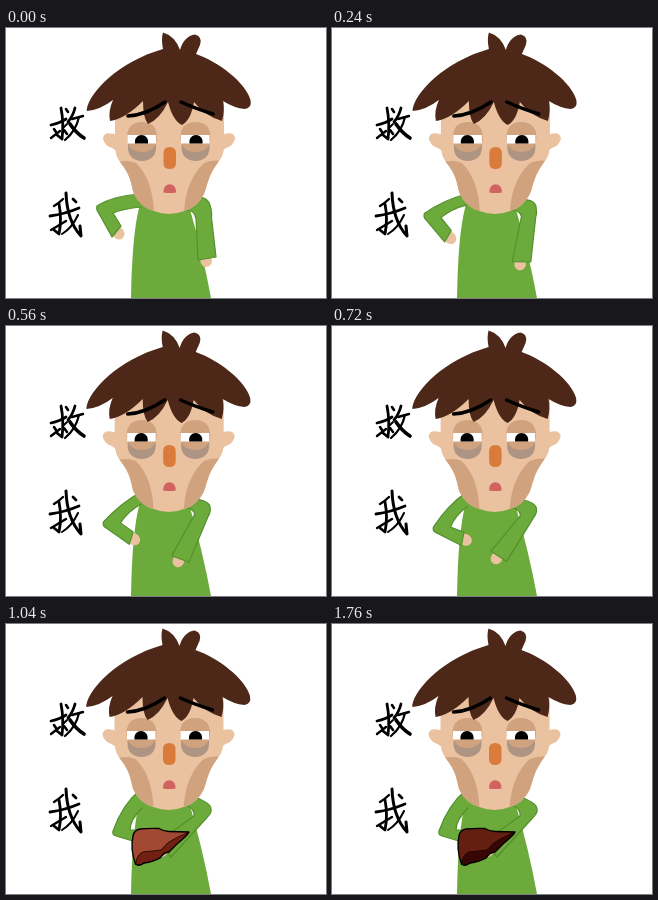
Animation of 320x270 px, one loop 2.2 s. Source, as an HTML page with a canvas:

```html
<!DOCTYPE html>
<html lang="zh">
<head>
<meta charset="utf-8">
<style>
html, body { margin: 0; width: 100%; height: 100%; overflow: hidden; background: #fff; }
canvas { display: block; }
</style>
</head>
<body>
<canvas id="stage" width="320" height="270" role="img" aria-label="救我"></canvas>
<script>
const ctx = document.getElementById('stage').getContext('2d');
const LOOP = 2200, STEP = 40, LAST = 1760, ARMS_END = 900, LIVER_IN = 920;
const SKIN = '#eac2a0', SHADE = '#d0a27e', GREEN = '#6daa3c', SEAM = '#53902b', HAIR = '#4d2818';

const fill = (d, color) => {
  ctx.fillStyle = color;
  ctx.fill(new Path2D(d));
};
const line = (d, color, width) => {
  ctx.strokeStyle = color;
  ctx.lineWidth = width;
  ctx.stroke(new Path2D(d));
};
const oval = (x, y, rx, ry, color, turn = 0) => {
  ctx.fillStyle = color;
  ctx.beginPath();
  ctx.ellipse(x, y, rx, ry, turn, 0, Math.PI * 2);
  ctx.fill();
};

// Arm points: shoulder, bend, elbow, cuff outer, cuff inner, inner elbow, inner bend, armpit
const LEFT = [
  [134,166, 106,168, 91,181, 106,209, 115,198, 107,185, 117,181, 135,179],
  [135,166, 114,175, 95,195, 119,217, 124,205, 112,194, 121,183, 135,177],
  [134,166, 116,181, 107,210, 137,220, 138,206, 124,206, 124,196, 136,184]
];
const RIGHT = [
  [186,170, 203,166, 205,184, 210,229, 192,232, 190,191, 189,182, 179,182],
  [184,172, 205,173, 204,184, 189,236, 171,232, 189,188, 188,183, 179,181],
  [183,171, 205,178, 205,188, 165,233, 152,218, 188,192, 189,185, 180,181]
];

// Smooth path through three poses
function pose(keys, u) {
  const m = 0.489;
  const a = (u - m) * (u - 1) / m;
  const b = u * (u - 1) / (m * (m - 1));
  const c = u * (u - m) / (1 - m);
  return keys[0].map((v, i) => v * a + keys[1][i] * b + keys[2][i] * c);
}

function arm(keys, u, side) {
  const p = pose(keys, u);
  const cx = (p[6] + p[8]) / 2, cy = (p[7] + p[9]) / 2;
  const dir = Math.atan2(cy - (p[5] + p[11]) / 2, cx - (p[4] + p[10]) / 2);
  oval(cx + Math.cos(dir) * 2 - side, cy + Math.sin(dir) * 2, 6.5, 5.8, SKIN, dir);
  ctx.beginPath();
  ctx.moveTo(p[0], p[1]);
  ctx.quadraticCurveTo(p[2], p[3], p[4], p[5] - 3);
  ctx.quadraticCurveTo(p[4] + side, p[5] + 1, p[4] + (p[6] - p[4]) * 0.1, p[5] + (p[7] - p[5]) * 0.1 + 1);
  ctx.lineTo(p[6], p[7]);
  ctx.lineTo(p[8], p[9]);
  ctx.lineTo(p[10], p[11]);
  ctx.quadraticCurveTo(p[12], p[13], p[14], p[15]);
  ctx.fillStyle = GREEN;
  ctx.fill();
  ctx.strokeStyle = SEAM;
  ctx.lineWidth = 1.2;
  ctx.stroke();
}

function eye(x, look) {
  ctx.save();
  ctx.translate(x, 0);
  fill('M-14 115 H14 V120 C14 128 8 133 0 133 C-8 133 -14 128 -14 120Z', '#ae9583');
  fill('M-15 109 C-15 99 -9 94 0 94 C9 94 15 99 15 109 C15 119 9 124 0 124 C-9 124 -15 119 -15 109Z', SHADE);
  fill('M-14.5 107 H14 V115.500 H-14.5Z', '#fff');
  ctx.translate(look, 0);
  fill('M-6.5 115.500 C-8 104 8 104 6.5 115.500Z', '#000');
  ctx.restore();
}

function face() {
  const shape = 'M109 60 H218 V118 Q218 127 213 133 C201 149 202 157 198 166 Q191 180 178 183 Q171 186 163 186 ' +
    'Q155 186 148 183 Q135 180 128 166 C125 157 126 149 114 134 Q109 127 109 118Z';
  fill(shape, SKIN);
  ctx.save();
  ctx.clip(new Path2D(shape));
  fill('M108 135 Q121 131 130 135 Q147 151 148 186 L108 186Z', SHADE);
  fill('M218 133 Q204 131 197 136 Q179 154 178 186 L218 186Z', SHADE);
  ctx.restore();
}

function head() {
  fill('M112 107 Q97 102 97 111 Q99 118 106 120 L112 124Z', SKIN);
  fill('M214 107 Q229 102 229 111 Q227 118 220 120 L214 124Z', SKIN);
  face();
  eye(136, -0.5);
  eye(189.500, 0.5);
  fill('M157.500 125 Q157.500 119 163.700 119 Q170 119 170 125 V135 Q170 141 163.700 141 Q157.500 141 157.500 135Z', '#d97c3b');
  fill('M157.500 164.500 C157 153.500 170.500 153.500 170 164.500 Q164 165.500 157.500 164.500Z', '#d06260');
  fill('M80.800 81 C84 64 112 34 157 21 Q155 11 157 4.500 Q169 8 174 22 Q178 8 189 6.500 Q197 9 194 17 L190 26 ' +
    'C213 34 240 55 244.500 72 Q246 80 239 81 Q228 80 217 73 Q219 83 216 93 Q199 88 188 74 Q185 92 176 97 Q167 93 162 74 ' +
    'Q154 91 142 96 Q137 90 137 73 Q119 91 104 93 Q102 83 107 72 Q94 82 80.800 83Z', HAIR);
  line('M122 88 Q140 87 159 74', '#000', 3.5);
  line('M175 74 Q188 80 207 86', '#000', 3.5);
}

function body() {
  fill('M135 165 L133 180 Q126 208 125 270 H205 Q197 226 183 178Z', GREEN);
}

function liver(t) {
  const k = (t - LIVER_IN) / (LAST - LIVER_IN);
  const mix = (a, b) => 'rgb(' + a.map((v, i) => Math.round(v + (b[i] - v) * k)) + ')';
  const base = 'Q181 212 172 219 L163 228 Q158 228 154 234 Q147 238 138 239 Q133 243 129.500 240';
  const whole = 'M129.500 240 Q124 225 127 212 Q128 206 134 205 Q144 204 153 204.500 Q158 207.500 163 207.500 L183 208 ' + base + 'Z';
  const under = 'M129.500 240 Q131 230 137 228 Q147 227 155 226 Q161 218 170 214 L183 208 ' + base + 'Z';
  fill(whole, mix([172, 80, 58], [101, 31, 16]));
  fill(under, mix([122, 36, 20], [56, 6, 4]));
  line(under, '#160503', 0.8);
  line(whole, '#000', 1.4);
}

// Brush lettering: stroke path and width
const LETTERS = [
  ['M45 97 Q54 95 60 91', 2.8], ['M55 80 Q58 95 56 111 L51 107', 2.8],
  ['M48 101 L50 104', 2.6], ['M45 110 L54 103', 2.4], ['M61 96 L58 99', 2],
  ['M58 102 L61 106', 2.6], ['M60 81 L62 84', 2.6],
  ['M69 80 Q67 88 62 94', 2.8], ['M66 91 L77 88', 2.4],
  ['M73 89 Q70 103 59 112', 2.2], ['M64 96 Q70 105 78 110', 3.6],
  ['M57 171 Q53 175 48 178', 2.4], ['M44 188 Q59 186 73 180', 2.8],
  ['M53 176 Q56 191 53 206 L48 202', 2.8], ['M45 202 L60 193', 2.4],
  ['M60 165 Q61 193 75 208 L74 198', 3], ['M72 187 Q66 200 56 206', 2],
  ['M67 171 L70 174', 2.8]
];

function draw(t) {
  ctx.fillStyle = '#fff';
  ctx.fillRect(0, 0, 320, 270);
  ctx.lineCap = ctx.lineJoin = 'round';
  LETTERS.forEach(([d, w]) => line(d, '#000', w));
  const u = Math.min(t / ARMS_END, 1);
  body();
  arm(LEFT, u, -1);
  arm(RIGHT, u, 1);
  ctx.save();
  ctx.translate(-0.5 * u, 0);
  head();
  ctx.restore();
  if (t >= LIVER_IN) liver(t);
}

const start = performance.now();
function tick() {
  const t = (performance.now() - start) % LOOP;
  draw(Math.min(Math.floor(t / STEP) * STEP, LAST));
  requestAnimationFrame(tick);
}
tick();
</script>
</body>
</html>
```
